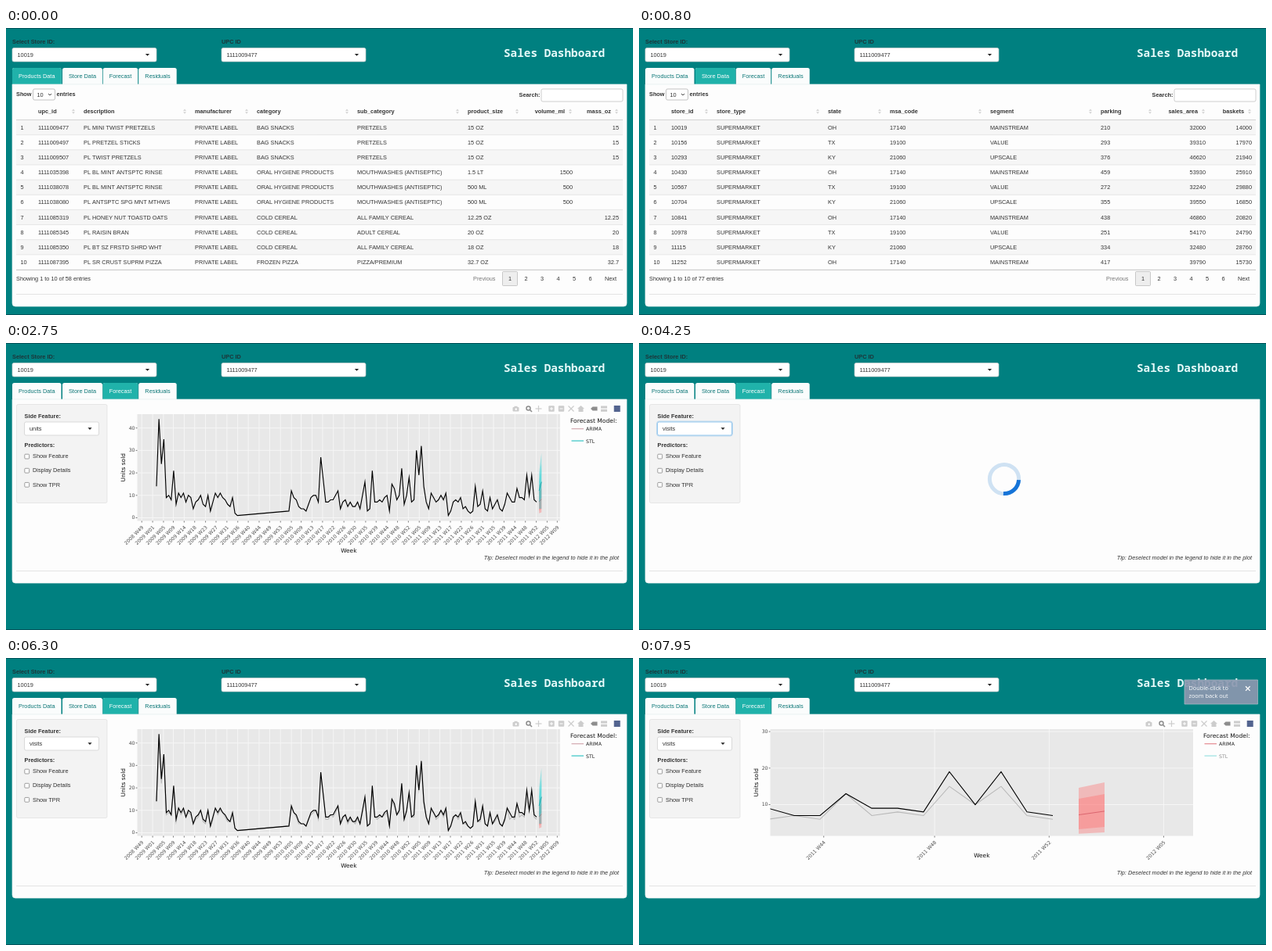
Animation, 800 px wide and 367 px high, one loop 8 s. Source, as an HTML page with a canvas:

```html
<!DOCTYPE html>
<html lang="en">
<head>
<meta charset="utf-8">
<title>Sales Dashboard</title>
<style>
html, body { margin: 0; width: 100%; height: 100%; overflow: hidden; background: #008080; }
canvas { display: block; }
</style>
</head>
<body>
<canvas id="stage" width="800" height="367"></canvas>
<script>
const ctx = document.getElementById('stage').getContext('2d');
const LOOP = 8000;
const UI = '"Liberation Sans", Arial, sans-serif';
const CHART = '"DejaVu Sans", Verdana, sans-serif';
const TEAL = '#20b2aa';

// Key moments in ms
const COLLAPSE = 400, STORES = 600, FORECAST = 1650, PLOT = 2500, LEAVE = 3200, OPEN = 3450,
  HOVER = 3900, PICK = 4100, REPLOT = 4950, RETURN = 5300, BLUR = 5800, DRAG = 6350,
  ZOOM = 6650, HIDE_STL = 7500;

const ramp = (t, start, length) => Math.min(1, Math.max(0, (t - start) / length));

function text(s, x, y, { size = 7.33, font = UI, style = '', color = '#333', align = 'left', base = 'alphabetic' } = {}) {
  ctx.font = `${style} ${size}px ${font}`;
  ctx.fillStyle = color;
  ctx.textAlign = align;
  ctx.textBaseline = base;
  ctx.fillText(s, x, y);
}
const bold = (s, x, y, more) => text(s, x, y, { style: 'bold', ...more });

function box(x, y, w, h, fill, stroke, radius = 0) {
  ctx.beginPath();
  ctx.roundRect(x, y, w, h, radius);
  if (fill) { ctx.fillStyle = fill; ctx.fill(); }
  if (stroke) { ctx.strokeStyle = stroke; ctx.lineWidth = 0.7; ctx.stroke(); }
}

function line(points, color, width = 1) {
  ctx.beginPath();
  points.forEach(([x, y]) => ctx.lineTo(x, y));
  ctx.strokeStyle = color;
  ctx.lineWidth = width;
  ctx.stroke();
}

function polygon(points, color) {
  ctx.beginPath();
  points.forEach(([x, y]) => ctx.lineTo(x, y));
  ctx.fillStyle = color;
  ctx.fill();
}

function rotated(s, x, y, angle, options) {
  ctx.save();
  ctx.translate(x, y);
  ctx.rotate(angle);
  text(s, 0, 0, options);
  ctx.restore();
}

function withAlpha(alpha, draw) {
  ctx.save();
  ctx.globalAlpha = alpha;
  draw();
  ctx.restore();
}

function select(label, x, y, w, h, focused) {
  if (focused) box(x - 1, y - 1, w + 2, h + 2, null, 'rgba(102,175,233,.5)', 3);
  box(x, y, w, h, '#fff', focused ? '#66afe9' : '#ccc', 2);
  text(label, x + 6.5, y + h / 2 + 2.6);
  const cx = x + w - 11.5, cy = y + h / 2;
  polygon([[cx - 2.6, cy - 1.2], [cx + 2.6, cy - 1.2], [cx, cy + 1.6]], '#222');
}

function header(t) {
  ctx.fillStyle = '#008080';
  ctx.fillRect(0, 0, 800, 367);
  ctx.fillStyle = '#04535a';
  ctx.fillRect(0, 0, 800, 1);
  ctx.fillRect(0, 366, 800, 1);
  bold('Select Store ID:', 8, 19.5, { color: '#1d3438' });
  bold('UPC ID', 275, 19.5, { color: '#1d3438' });
  select('10019', 8, 25.5, 184, 17.5);
  select('1111009477', 275, 25.5, 184, 17.5);
  bold('Sales Dashboard', 635, 37, { size: 14.35, font: '"Noto Sans Mono", "DejaVu Sans Mono", monospace', color: '#e6fafa' });

  const tabs = [
    ['Products Data', 8, 62.5, 1 - ramp(t, 460, 200)],
    ['Store Data', 72, 51, ramp(t, 50, 150) - ramp(t, FORECAST - 40, 80)],
    ['Forecast', 123.7, 44.5, ramp(t, 1250, 150)],
    ['Residuals', 169.2, 48.5, 0],
  ];
  for (const [name, x, w, active] of tabs) {
    const draw = (fill, color) => {
      box(x, 51, w, 21.5, fill, null, [2.5, 2.5, 0, 0]);
      text(name, x + w / 2, 64, { color, align: 'center' });
    };
    draw('#fafcfc', '#0b7676');
    if (active > 0) withAlpha(active, () => draw(TEAL, '#fff'));
  }
  if (t >= COLLAPSE && t < STORES) box(8.5, 51.5, 61.5, 21, null, '#9be0dc', [2.5, 2.5, 0, 0]);
}

function panel(bottom) {
  box(8, 72, 784, bottom - 72, '#fdfdfd', '#e3ecec', [0, 0, 4, 4]);
  line([[13, bottom - 15.5], [787, bottom - 15.5]], '#e4e4e4');
}

// Column: title, left edge, right edge (numbers only), sort icon position
const productColumns = [
  ['upc_id', 41, 0, 86], ['description', 99, 0, 228], ['manufacturer', 241, 0, 307], ['category', 320, 0, 435],
  ['sub_category', 448, 0, 576], ['product_size', 589, 0, 652], ['volume_ml', 0, 723, 720], ['mass_oz', 0, 782, 779],
];
const productRows = [
  '1111009477|PL MINI TWIST PRETZELS|BAG SNACKS|PRETZELS|15 OZ||15',
  '1111009497|PL PRETZEL STICKS|BAG SNACKS|PRETZELS|15 OZ||15',
  '1111009507|PL TWIST PRETZELS|BAG SNACKS|PRETZELS|15 OZ||15',
  '1111035398|PL BL MINT ANTSPTC RINSE|ORAL HYGIENE PRODUCTS|MOUTHWASHES (ANTISEPTIC)|1.5 LT|1500|',
  '1111038078|PL BL MINT ANTSPTC RINSE|ORAL HYGIENE PRODUCTS|MOUTHWASHES (ANTISEPTIC)|500 ML|500|',
  '1111038080|PL ANTSPTC SPG MNT MTHWS|ORAL HYGIENE PRODUCTS|MOUTHWASHES (ANTISEPTIC)|500 ML|500|',
  '1111085319|PL HONEY NUT TOASTD OATS|COLD CEREAL|ALL FAMILY CEREAL|12.25 OZ||12.25',
  '1111085345|PL RAISIN BRAN|COLD CEREAL|ADULT CEREAL|20 OZ||20',
  '1111085350|PL BT SZ FRSTD SHRD WHT|COLD CEREAL|ALL FAMILY CEREAL|18 OZ||18',
  '1111087395|PL SR CRUST SUPRM PIZZA|FROZEN PIZZA|PIZZA/PREMIUM|32.7 OZ||32.7',
].map(row => {
  const cells = row.split('|');
  cells.splice(2, 0, 'PRIVATE LABEL');
  return cells;
});
const storeColumns = [
  ['store_id', 41, 0, 86], ['store_type', 99, 0, 228], ['state', 241, 0, 307], ['msa_code', 320, 0, 435],
  ['segment', 448, 0, 576], ['parking', 589, 0, 652], ['sales_area', 0, 723, 720], ['baskets', 0, 782, 779],
];
const storeRows = Array.from({ length: 10 }, (_, i) => [
  10019 + i * 137, 'SUPERMARKET', ['OH', 'TX', 'KY'][i % 3], 17140 + i % 3 * 1960,
  ['MAINSTREAM', 'UPSCALE', 'VALUE'][i * 2 % 3], 210 + i * 83 % 270, 32000 + i * 7310 % 29000, 14000 + i * 3970 % 17000,
]);

function table(columns, rows, total) {
  panel(356);
  bold('Show', 13, 87.3);
  box(34.5, 78, 28, 14, '#fff', '#aaa', 2);
  text('10', 39.5, 87.6);
  line([[54, 84], [56, 86], [58, 84]], '#333', 0.9);
  bold('entries', 64.5, 87.3);
  bold('Search:', 654.5, 88);
  box(683, 78, 104, 16, '#fff', '#bbb', 2);

  for (const [title, left, right, icon] of columns) {
    bold(title, left || right - 10, 109.3, { align: left ? 'left' : 'right' });
    polygon([[icon - 2, 106], [icon + 2, 106], [icon, 103.5]], '#d4d4d4');
    polygon([[icon - 2, 107.2], [icon + 2, 107.2], [icon, 109.7]], '#d4d4d4');
  }
  rows.forEach((cells, i) => {
    const top = 117.5 + i * 19.15;
    box(13, top, 774, 19.15, i % 2 ? '#fdfdfd' : '#f6f6f6');
    line([[13, top], [787, top]], i ? '#dedede' : '#c4c4c4', 0.7);
    text(i + 1, 18.5, top + 12.2);
    cells.forEach((cell, c) => {
      const [, left, right] = columns[c];
      text(cell, left || right, top + 12.2, { align: left ? 'left' : 'right' });
    });
  });
  line([[13, 309.3], [787, 309.3]], '#aaa', 0.7);

  text(`Showing 1 to 10 of ${total} entries`, 13, 322.8);
  text('Previous', 596, 322.8, { color: '#777' });
  box(633.5, 311.5, 19, 18, '#eeeeee', '#b5b5b5', 1);
  for (let page = 1; page <= 6; page++) text(page, 622.6 + page * 20.5, 322.8, { align: 'center' });
  text('Next', 764, 322.8);
}

function sidebar(t) {
  box(13.5, 78.5, 115.5, 126, '#f3f3f3', '#dedede', 2);
  bold('Side Feature:', 23.5, 95.6);
  select(t < PICK ? 'units' : 'visits', 23.5, 101, 95, 17, t >= OPEN && t < BLUR);
  bold('Predictors:', 23.5, 132.6);
  ['Show Feature', 'Display Details', 'Show TPR'].forEach((label, i) => {
    const y = 145 + i * 18.1;
    box(23.8, y - 2.8, 5.8, 5.8, '#fff', '#777', 1);
    text(label, 34, y + 2.3);
  });
  if (t >= OPEN && t < PICK) {
    box(23.5, 118, 95, 43, '#fff', '#ccc', [0, 0, 2, 2]);
    box(24, t < HOVER ? 120 : 133, 94, 13, '#efefef');
    ['units', 'visits', 'hhs'].forEach((label, i) => text(label, 30, 129 + i * 13));
  }
}

function spinner(degrees) {
  const arc = (from, to, color) => {
    ctx.beginPath();
    ctx.arc(466, 174, 18.6, from, to);
    ctx.strokeStyle = color;
    ctx.lineWidth = 5;
    ctx.stroke();
  };
  const start = degrees * Math.PI / 180;
  arc(0, Math.PI * 2, '#cfe2f3');
  arc(start, start + Math.PI / 2, '#1574d8');
}

// Weekly sales before and after a gap; weeks are counted back from the last one
const early = [14, 44, 24, 35, 9, 10, 8, 21, 6, 11, 9, 11, 7, 10, 9, 4, 7, 8, 10, 6, 5, 10, 3, 7, 11, 9, 11, 9, 8, 6, 5, 9, 2, 1];
const late = [
  3, 12, 9, 8, 5, 4, 4, 3, 6, 9, 10, 10, 7, 27, 17, 7, 7, 8, 8, 10, 12, 4, 7, 8, 5, 7, 5, 5, 7, 4, 10, 16, 3, 4,
  21, 7, 7, 8, 7, 9, 10, 3, 15, 13, 8, 10, 22, 6, 10, 18, 7, 8, 30, 19, 32, 14, 7, 4, 11, 9, 7, 8, 10, 8, 11, 1, 3, 7,
  8, 7, 9, 4, 5, 3, 2, 3, 14, 5, 6, 12, 4, 3, 9, 4, 6, 8, 4, 3, 6, 11, 9, 7, 7, 13, 9, 9, 8, 19, 10, 19, 8, 7,
];
const units = [...early.map((v, i) => [i - 155, v]), ...late.map((v, i) => [i - 101, v])];
const lastVisits = [6, 7, 6, 13, 7, 8, 7, 15, 10, 15, 7, 6];
const visits = units.map(([week, v], i) =>
  [week, week > -12 ? lastVisits[week + 11] : v > 4 && i % 3 ? v - (v > 20 ? 2 : 1) : v]);

// Bands hold low and high at the first and second forecast week
const models = [
  { name: 'ARIMA', rgb: '255,100,100', line: '#d9606a', mean: [7.2, 8.2], bands: [[2, 14.6, 2.4, 16.1], [3.25, 11.6, 3.9, 12.9]] },
  { name: 'STL', rgb: '0,206,209', line: '#10aeb0', mean: [12, 16], bands: [[4, 20, 4, 29], [7, 16, 9, 24]] },
];

// First day of each month, labelled with its ISO week
const WEEK = 7 * 864e5;
const months = Array.from({ length: 40 }, (_, i) => {
  const time = Date.UTC(2008, 11 + i, 1);
  const weekday = (new Date(time).getUTCDay() + 6) % 7;
  const thursday = time + (3 - weekday) * 864e5;
  const year = new Date(thursday).getUTCFullYear();
  const number = 1 + Math.floor((thursday - Date.UTC(year, 0, 1)) / WEEK);
  return { week: (time - Date.UTC(2012, 0, 2)) / WEEK, label: `${year} W${String(number).padStart(2, '0')}` };
});

const AREA = { x: 167.5, y: 91, w: 539.5, h: 136.5 };

function modebar() {
  const soft = '#cdcdcd', strong = '#8d8d8d';
  box(646.5, 82, 8, 5.5, soft, null, 1);
  box(648.5, 80.8, 4, 2, soft);
  box(649.5, 83.3, 2.4, 2.6, '#fdfdfd', null, 1.3);
  ctx.beginPath();
  ctx.arc(666.5, 83.5, 2.5, 0, 7);
  ctx.strokeStyle = strong;
  ctx.lineWidth = 1.5;
  ctx.stroke();
  line([[668.3, 85.3], [671, 88]], strong, 1.6);
  line([[675.5, 84], [683.5, 84]], soft, 1.2);
  line([[679.5, 80], [679.5, 88]], soft, 1.2);
  for (const x of [696, 708.5]) {
    box(x - 3.7, 80.3, 7.4, 7.4, soft, null, 1);
    line([[x - 2, 84], [x + 2, 84]], '#fff', 1);
  }
  line([[696, 82], [696, 86]], '#fff', 1);
  line([[717.5, 80.5], [724.5, 87.5]], soft, 1.2);
  line([[717.5, 87.5], [724.5, 80.5]], soft, 1.2);
  polygon([[729, 84], [733.5, 80], [738, 84], [736.5, 84], [736.5, 88], [730.5, 88], [730.5, 84]], soft);
  polygon([[746, 84], [748.5, 81.5], [754.5, 81.5], [754.5, 86.5], [748.5, 86.5]], strong);
  box(759, 80.5, 8, 3, soft);
  box(759, 84.8, 8, 3, soft);
  box(775.7, 80, 8, 8, '#53648f');
}

function chart(t) {
  const zoomed = t >= ZOOM;
  const px = zoomed ? week => 528 + week * 33 : week => 677 + week * 3.129;
  const py = zoomed ? v => 187.5 - (v - 10) * 4.67 : v => 223.5 - v * 2.87;
  const right = AREA.x + AREA.w, bottom = AREA.y + AREA.h;
  const ticks = months.map(m => ({ x: px(m.week), label: m.label })).filter(m => m.x > AREA.x && m.x < right);
  const levels = zoomed ? [10, 20, 30] : [0, 10, 20, 30, 40];
  const tickText = { size: 6.2, font: CHART, color: '#4d4d4d', align: 'right', base: 'middle' };

  ctx.save();
  box(AREA.x, AREA.y, AREA.w, AREA.h, '#e8e8e8');
  ctx.clip();
  ticks.forEach(({ x }) => line([[x, AREA.y], [x, bottom]], '#f8f8f8', 0.9));
  levels.forEach(v => line([[AREA.x, py(v)], [right, py(v)]], '#f8f8f8', 0.9));
  const place = ([week, v]) => [px(week), py(v)];
  if (t >= REPLOT) line(visits.map(place), '#b9b9b9', 1.1);
  line(units.map(place), '#000', 1.15);
  for (const { name, rgb, line: color, mean, bands } of models) {
    if (name === 'STL' && t >= HIDE_STL) continue;
    for (const [low1, high1, low2, high2] of bands) {
      polygon([[1, low1], [1, high1], [2, high2], [2, low2]].map(place), `rgba(${rgb},.35)`);
    }
    line([[1, mean[0]], [2, mean[1]]].map(place), color, 0.9);
  }
  if (t >= DRAG && t < ZOOM) {
    const k = ramp(t, DRAG, ZOOM - DRAG - 50);
    ctx.beginPath();
    ctx.rect(AREA.x, AREA.y, AREA.w, AREA.h);
    ctx.rect(644, 135, 50 * k, 84 * k);
    ctx.fillStyle = `rgba(0,0,0,${0.3 * ramp(t, DRAG, 200)})`;
    ctx.fill('evenodd');
  }
  ctx.restore();

  for (const { x, label } of ticks) {
    line([[x, bottom], [x, bottom + 2]], '#444', 0.7);
    rotated(label, x + 1.5, 235, -Math.PI / 4, tickText);
  }
  for (const v of levels) {
    line([[AREA.x - 2, py(v)], [AREA.x, py(v)]], '#444', 0.7);
    text(v, 164.5, py(v) + 0.3, tickText);
  }
  const title = { size: 7.4, font: CHART, color: '#111', align: 'center' };
  text('Week', 437.3, zoomed ? 255 : 267.5, title);
  rotated('Units sold', 152.3, 159.3, -Math.PI / 2, title);

  text('Forecast Model:', 720, 102.4, { size: 7.55, font: CHART, color: '#111' });
  models.forEach(({ name }, i) => {
    const y = 109.7 + i * 15.4;
    withAlpha(i && t >= HIDE_STL ? 0.5 : 1, () => {
      line([[721.5, y], [737, y]], i ? '#35c4c4' : zoomed ? '#e58a90' : '#d3a9b0', 1.2);
      text(name, 740, y + 2.4, { size: 6.2, font: CHART, color: '#222' });
    });
  });
  if (t < LEAVE || t >= RETURN) modebar();
}

function toast(t) {
  withAlpha(ramp(t, ZOOM, 600), () => {
    box(696, 28, 93.5, 31, 'rgba(140,151,175,.92)', '#a9bcc6');
    const style = { size: 7.3, font: '"Open Sans", sans-serif', color: '#fff' };
    text('Double-click to', 701.5, 41, style);
    text('zoom back out', 701.5, 51, style);
    line([[774, 36.3], [779.6, 41.9]], '#fff', 1.3);
    line([[774, 41.9], [779.6, 36.3]], '#fff', 1.3);
  });
}

function render(t) {
  header(t);
  if (t < COLLAPSE) table(productColumns, productRows, 58);
  else if (t < STORES) panel(104);
  else if (t < FORECAST) table(storeColumns, storeRows, 77);
  else {
    panel(307);
    if (t < PLOT) spinner(162 + (t - FORECAST) * 360 / 1100);
    else if (t >= PICK && t < REPLOT) spinner(3 + (t - 4250) * 360 / 1100);
    else chart(t);
    text('Tip: Deselect model in the legend to hide it in the plot', 782, 277.3, { style: 'italic', align: 'right' });
    sidebar(t);
    if (t >= ZOOM) toast(t);
  }
}

const begin = performance.now();
function tick() {
  render((performance.now() - begin) % LOOP);
  requestAnimationFrame(tick);
}
tick();
</script>
</body>
</html>
```
